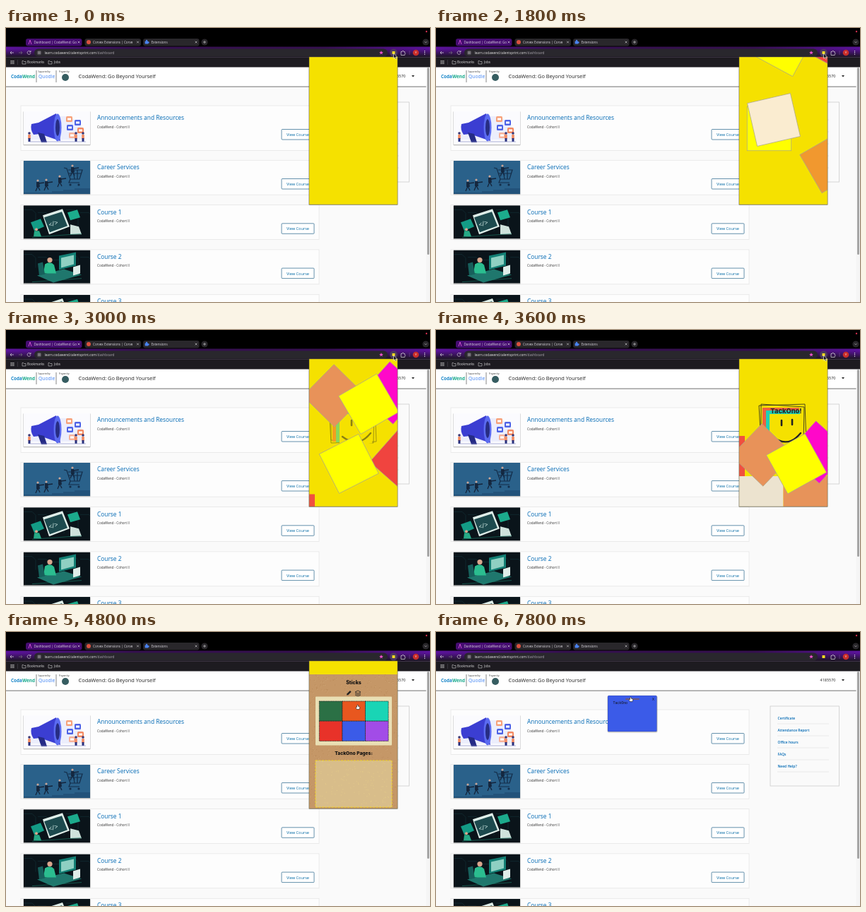
Write an HTML page that moves like this. It is 600 px wide and 388 px high and loops after 8 s.

```html
<!DOCTYPE html>
<html lang="en">
<head>
<meta charset="utf-8">
<title>Sticky notes</title>
<style>
html, body { margin: 0; width: 100%; height: 100%; overflow: hidden; background: #fafafa; }
svg { display: block; width: 600px; height: 388px; font-family: "Open Sans", sans-serif; }
.mono { font-family: "Liberation Mono", monospace; }
.bold { font-family: Inter, sans-serif; font-weight: 800; }
</style>
</head>
<body>
<svg id="stage" viewBox="0 0 600 388"></svg>
<script>
const LOOP = 8000, STEP = 200;
const stage = document.getElementById('stage');

const rect = (x, y, w, h, fill, more = '') =>
  `<rect x="${x}" y="${y}" width="${w}" height="${h}" fill="${fill}" ${more}/>`;
const dot = (x, y, r, fill, more = '') => `<circle cx="${x}" cy="${y}" r="${r}" fill="${fill}" ${more}/>`;
const path = (d, fill, more = '') => `<path d="${d}" fill="${fill}" ${more}/>`;
const line = (d, color, width = 0.7, more = '') =>
  path(d, 'none', `stroke="${color}" stroke-width="${width}" ${more}`);
// y is the middle of the line of text
const text = (x, y, size, fill, words, more = '') =>
  `<text x="${x}" y="${y + size * 0.35}" font-size="${size}" fill="${fill}" ${more}>${words}</text>`;
const group = (id, inner, more = '') => `<g id="${id}" ${more}>${inner}</g>`;
const middle = 'text-anchor="middle"';

function puzzle(x, y, color) {
  return rect(x - 2.4, y - 1.6, 4.6, 4.2, color, 'rx=".6"') + dot(x, y - 2, 1.2, color) + dot(x + 2.4, y + 0.5, 1.2, color);
}

function star(x, y, r, color) {
  const points = Array.from({ length: 10 }, (_, i) => {
    const a = i * Math.PI / 5 - Math.PI / 2, d = i % 2 ? r * 0.45 : r;
    return `${x + d * Math.cos(a)},${y + d * Math.sin(a)}`;
  });
  return `<polygon points="${points.join(' ')}" fill="${color}"/>`;
}

function tab(x, fill, icon, label) {
  return rect(x, 15, 79.5, 10.5, fill, 'rx="3"') + icon + text(x + 11.5, 20, 4.6, '#dcd9e0', label) +
    line(`M${x + 73.6} 18.600l2.800 2.800m0-2.800l-2.800 2.800`, '#ddd', 0.6);
}

function browser() {
  return rect(0, 0, 600, 29, '#000') +
    rect(0, 26.5, 600, 15, 'url(#theme)') + rect(0, 26.5, 600, 15, 'url(#shade)') +
    tab(28, '#450c70', line('M32 23l2-6 2 6', '#d955d9', 0.9), 'Dashboard | CodaWend: Go') +
    tab(111.5, '#29272b', dot(117, 20, 3, '#d9513f'), 'Corvex Extensions | Corve') +
    tab(194, '#29272b', puzzle(199, 20, '#4a83ee'), 'Extensions') +
    dot(281, 20, 4.6, '#29272b') + line('M279 20h4m-2-2v4', '#ddd', 0.6) +
    dot(594, 20, 4.6, '#29272b') + line('M592.500 19.300l1.500 1.500 1.500-1.500', '#ddd', 0.6) +
    dot(595, 5, 1.2, '#c92e4a') +
    rect(40, 29.5, 500, 11, '#29272d', 'rx="5.5"') +
    line('M11 35H6m2-2l-2 2 2 2', '#ddd') + line('M18 35h5m-2-2l2 2-2 2', '#777') +
    line('M34.500 33.500a2.400 2.400 0 1 0 .400 2M35 32v2h-2', '#ddd') +
    dot(47, 35, 3.5, '#444048') + line('M45 34h4M45 36h4', '#eee', 0.6) +
    text(54.5, 35, 4.75, '#e6e6e6', 'learn.codawend.talentsprint.com<tspan fill="#a6a3aa">/dashboard</tspan>') +
    star(531, 35, 3, '#f04fd0') +
    group('glow', dot(548.5, 35, 5.5, '#4c3a60')) + rect(546.5, 33, 4, 4, '#f5dc20') +
    line('M559 33.500h1.500a1.200 1.200 0 0 1 2.400 0h1.300v1.500a1.200 1.200 0 0 1 0 2.300v1.200h-5.200z', '#ddd') +
    line('M571 32v6', '#6d4590') +
    dot(580, 35, 4.3, '#c92e2a') + text(580, 35, 4, '#fff', 'V', middle) +
    [32.7, 35, 37.3].map(y => dot(592.5, y, 0.65, '#eee')).join('') +
    rect(0, 41.5, 600, 14, '#1d1b20') +
    [0, 1, 2].flatMap(i => [0, 1, 2].map(j => rect(6.5 + i * 1.9, 46 + j * 1.9, 1.2, 1.2, '#ccc'))).join('') +
    line('M16.500 45v7', '#55505c', 0.5) +
    [23, 60].map(x => line(`M${x} 46.500h1.500l1 1h2.500v3.500h-5z`, '#ccc', 0.6)).join('') +
    text(30, 48.5, 4.6, '#ddd', 'Bookmarks') + text(68, 48.5, 4.6, '#ddd', 'Jobs');
}

function header() {
  return rect(0, 55.5, 600, 27.5, '#fff') + rect(0, 82.5, 600, 1.2, '#888') +
    text(7, 69, 6.4, '#1685c8', 'Coda<tspan fill="#16a98b">Wend</tspan>', 'font-weight="700"') +
    line('M43 60v17M71 60v17', '#555', 0.7) +
    text(45.5, 62, 2.7, '#333', 'Supported by:') + text(46, 69, 6.8, '#4285f4', 'Quodle') +
    text(75, 62, 2.7, '#333', 'Program by:') + dot(84, 70, 5, '#365d61') +
    text(102.5, 68, 7.4, '#222', 'CodaWend: Go Beyond Yourself') +
    text(543.5, 68, 5.5, '#222', '4185570') + path('M574 67h4l-2 2.500z', '#222');
}

function megaphone() {
  return rect(0, 0, 94, 47, '#fbfbfe') +
    path('M8 40q0-14 12-16q4-16 22-14q20-8 32 4q14 8 10 26z', '#eceefc') +
    path('M11 18l10-2 25-13 6 39-29-10-9 1q-5-7-3-15z', '#3b3ed2') + path('M20 30l9 2 4 12h-8z', '#252b86') +
    `<ellipse cx="48" cy="23" rx="5.5" ry="19.500" fill="#5b6bf0"/><ellipse cx="48" cy="23" rx="3" ry="12" fill="#272d83"/>` +
    [[60, 7, '#f7a17a'], [72, 12, '#4d62e6'], [61, 19, '#4d62e6'], [76, 23, '#f38961'], [64, 30, '#f7b39a']]
      .map(([x, y, c]) => rect(x, y, 9, 8, c, 'rx="1.500"') + rect(x + 2, y + 2.5, 5, 3, '#fff')).join('') +
    [8, 74, 84].map(x => dot(x, 31, 1.8, '#39336e') + rect(x - 1.8, 33, 3.6, 6, '#f28b62') + rect(x - 1.5, 38, 3, 5, '#28307c')).join('') +
    line('M8 43H88', '#8a91c4', 0.7);
}

function climbers() {
  const person = (x, y) => dot(x, y, 1.6, '#c9a596') + path(`M${x - 2} ${y + 2}h4l1 7h-5z`, '#16283f') +
    line(`M${x} ${y + 8}l-3 7m3-7l3 6M${x + 1} ${y + 4}l8-1`, '#14243a', 1.3);
  return rect(0, 0, 94, 47, '#2a618a') + path('M0 47V45H40V43H56V41H72V39H94V47z', '#22527a') +
    person(20, 28) + person(32, 27) + person(51, 22) + person(69, 7) +
    line('M57 10l4 1 5 15h13l4-13H63M64 18h17M70 13l2 13M76 13v13', '#132c48', 1.2) +
    line('M66 26l-2 5h15', '#132c48', 1.2) + dot(66, 34, 1.6, '#132c48') + dot(78, 34, 1.6, '#132c48');
}

function coding(desk) {
  const circuits = [0, 1, 2, 3, 4].map(i => line(`M${i * 20} ${6 + i % 3 * 4}h12l5 5v${14 + i * 2}`, '#173a40', 0.5)).join('');
  const screen = desk
    ? path('M50 8l24-5v19l-24 6z', '#137f74') + path('M53 11l18-4v13l-18 5z', '#8fd0c2') +
      path('M19 36l38-9 25 8-40 11z', '#1f776d') + dot(37, 14, 3.6, '#d9a68d') +
      path('M30 20q8-5 13 1l3 12H28z', '#2bbd8f') + path('M20 19l7-2 3 17-8 2z', '#17605c') +
      path('M70 24l10-3v12l-10 3z', '#dfeee9')
    : path('M27 14l28-9 10 25-29 11z', '#dfeee9') + path('M29 17l25-8 8 20-25 9z', '#1d4a4e') +
      text(35, 25, 9, '#e9fff8', '&lt;/&gt;', 'transform="rotate(-18 44 25)"') +
      path('M10 24l14-5 5 11-14 6z', '#139b85') + path('M62 10l14-4 4 11-14 4z', '#1cab8c') +
      dot(18, 34, 2, '#d9a68d') + path('M15 36h7l3 8H14z', '#26a986') + path('M66 27l12 3 4 11H66z', '#cfe2dc');
  return rect(0, 0, 94, 47, '#0a141a') + circuits + screen + line('M12 45l70-5', '#1f826e', 0.6);
}

// top is the upper edge of the picture, pad the room the frame leaves around it
function card(top, pad, title, art) {
  return rect(21, top - pad, 422, 47.5 + pad * 2, '#fdfdfd', 'stroke="#e6e6e6" stroke-width=".8"') +
    rect(24.5, top, 95, 48.3, '#bbb', 'rx="1"') +
    `<svg x="25" y="${top}" width="94" height="47" viewBox="0 0 94 47">${art}</svg>` +
    text(129, top + 9.3, 8.35, '#0069b4', title) +
    text(129, top + 22, 4.6, '#333', 'CodaWend - Cohort II') +
    rect(390, top + 25.5, 46, 14.5, '#fff', 'rx="1" stroke="#3e7597" stroke-width=".8"') +
    text(413, top + 33, 5.6, '#0069a4', 'View Course', middle);
}

function sidebar() {
  const links = ['Certificate', 'Attendance Report', 'Office hours', 'FAQs', 'Need Help?'];
  return rect(473, 105, 97.5, 113, '#fafafa', 'stroke="#ccc" stroke-width=".8"') +
    links.map((label, i) => text(483.5, 122 + i * 17, 4.95, '#0069b4', label, 'font-weight="600"') +
      line(`M483 ${130 + i * 17}h73`, '#ddd', 0.6)).join('');
}

// ref time, x, y, angle, colour, then speeds per second: x, y, angle
const falling = [
  [1800, 557.5, 191, -30, '#f1982f', 0, 200, 0],
  [1800, 471.5, 142.5, 0, '#ffff00', 0, 200, 0],
  [1800, 478, 130, -13, '#faecd0', 0, 200, -10],
  [2600, 558, 128, -23, '#f0443f', 2, 140, -64],
  [2600, 487.5, 135, -8.5, '#ffff00', -5.6, 136, -46],
  [2600, 466, 37, 45, '#e89259', -4, 140, -1],
  [2600, 549, 33, 42, '#ff08c9', -9, 140, 0],
  [2600, 515.6, 48.4, -31, '#ffff00', -5.6, 141, 2]
];
const BEHIND_PILE = 5;

function logo() {
  return line('M457 107l65-2 2 53-64 2zM460 105l61 4-1 51-60-4z', '#222', 0.8) +
    rect(462, 110, 52, 48, '#f0603f') + rect(467, 114, 48, 45, '#1fd1b6') + rect(472, 119, 46, 41, '#f5e100') +
    line('M489 128v7M504 127v7', '#222', 2.6, 'stroke-linecap="round"') +
    line('M476 151q22 17 40-5', '#222', 2.3, 'stroke-linecap="round"') +
    text(495.5, 115, 9.3, '#292929', 'TackOno!', middle + ' class="bold"');
}

function splash() {
  const slips = falling.map(n =>
    rect(-31.25, -31.25, 62.5, 62.5, n[4], 'class="slip" stroke="#aaa58a" stroke-width=".7"'));
  const pile = rect(374.5, 150, 62.5, 62.5, '#f0503f') + rect(429, 207, 62.5, 62.5, '#ece3cf') +
    rect(491.5, 207, 62.5, 62.5, '#e7935a');
  return rect(429, 41, 125, 209, '#f5e100') + group('logo', logo()) +
    slips.slice(0, BEHIND_PILE).join('') + group('pile', pile) + slips.slice(BEHIND_PILE).join('');
}

function specks(count, x, y, w, h) {
  let seed = 7, d = '';
  const random = () => (seed = seed * 16807 % 2147483647) / 2147483647;
  for (let i = 0; i < count; i++) d += `M${(x + random() * w).toFixed(1)} ${(y + random() * h).toFixed(1)}h.9`;
  return d;
}

function board() {
  const swatches = ['#2b7045', '#e8571f', '#19d5b5', '#e83229', '#3b5be8', '#a24ce7'];
  return rect(429, 41, 125, 209, '#c59767') +
    line(specks(850, 429, 60, 124, 189), '#a97948', 0.8, 'opacity=".6"') +
    line(specks(420, 430, 61, 123, 188), '#debb8b', 0.8, 'opacity=".6"') +
    rect(429, 41, 125, 19, '#f5e100') +
    text(492, 71.5, 7, '#111', 'Sticks', middle + ' class="bold"') +
    path('M482 89.500l.6-2.200 4.300-4.300 1.700 1.700-4.300 4.300z', '#222') +
    line('M494 85l4-2 4 2-4 2zM494 87l4 2 4-2M494 89l4 2 4-2', '#222', 0.8) +
    rect(438, 91.5, 108, 69, '#e9dfb4', 'rx="1"') +
    swatches.map((c, i) => rect(443.3 + i % 3 * 32.6, 98 + (i > 2 ? 28.2 : 0), 32.6, 28.2, c,
      'stroke="#222" stroke-width=".8" stroke-dasharray="1.600 .8"')).join('') +
    text(492, 171.5, 6.7, '#111', 'TackOno Pages:', middle + ' class="bold"') +
    rect(438, 182, 108, 66, '#d8bd8a', 'stroke="#f2d628" stroke-width="1" stroke-dasharray="3 1.500"') +
    line(specks(160, 439, 183, 106, 64), '#e6cf8a', 0.8);
}

stage.innerHTML = `<defs>
  <linearGradient id="theme"><stop offset="0" stop-color="#5a129a"/><stop offset=".3" stop-color="#35104f"/>
    <stop offset=".75" stop-color="#35104f"/><stop offset="1" stop-color="#5a129a"/></linearGradient>
  <linearGradient id="shade" x2="0" y2="1"><stop offset=".2" stop-color="#1a161e" stop-opacity="0"/>
    <stop offset="1" stop-color="#1a161e"/></linearGradient>
  <clipPath id="window"><rect x="429" y="41" width="125" height="209"/></clipPath></defs>` +
  rect(0, 55, 600, 333, '#fafafa') + header() +
  card(118, 8, 'Announcements and Resources', megaphone()) +
  card(188, 0.7, 'Career Services', climbers()) +
  card(251.3, 0.7, 'Course 1', coding(false)) +
  card(314.6, 0.7, 'Course 2', coding(true)) +
  card(378, 0.7, 'Course 3', coding(false)) + sidebar() +
  rect(594.5, 55.5, 5.5, 333, '#f5f5f5') + rect(596, 56, 3, 265, '#a5a5a5', 'rx="1.500"') + browser() +
  group('memo', rect(242.5, 90.5, 71, 52, '#000', 'rx="2" opacity=".2"') +
    rect(243, 90, 69.5, 51, '#a24ce7', 'id="paper" rx="1.500" stroke="#0003" stroke-width=".6"') +
    rect(268, 94, 20, 2, '#6e5a78', 'rx="1"') + text(307.5, 95.5, 5, '#111', 'X', middle) +
    text(250.5, 100.5, 4.9, '#111', 'TackOno', 'class="mono"')) +
  group('popup', rect(428.5, 41, 126, 210, '#000', 'rx="1" opacity=".3"') +
    `<g clip-path="url(#window)">${group('splash', splash())}${group('board', board())}</g>` +
    rect(429, 41, 125, 209, 'none', 'stroke="#77724a" stroke-width=".5"')) +
  group('arrow', path('M0 0v7l1.700-1.500 1.200 2.600 1.200-.6-1.200-2.400h2.300z', '#111', 'stroke="#fff" stroke-width=".6"')) +
  group('hand', path('M-1 -2.500q.8-1 1.400 0v1.800q2 0 2.200 1v1.800l-.8 1.500h-3.200l-1.800-2.400q0-1 1.400-.3z', '#fff', 'stroke="#111" stroke-width=".6"'));

const $ = id => document.getElementById(id);
const slips = [...document.querySelectorAll('.slip')];
const show = (id, on) => $(id).style.display = on ? '' : 'none';
const move = (el, x, y, angle = 0) => el.setAttribute('transform', `translate(${x} ${y}) rotate(${angle})`);
const clamp = v => Math.max(0, Math.min(1, v));

// time, x, y
const pointer = [
  [0, 548.5, 36], [4000, 548.5, 36], [4600, 498, 106], [4800, 498, 106], [5200, 525, 140],
  [5600, 525, 140], [6000, 481, 146], [6400, 481, 146], [7000, 345, 125], [7400, 276, 95], [8000, 276, 95]
];

function pointerAt(t) {
  const i = pointer.findIndex(p => p[0] > t);
  const [a, b] = [pointer[i - 1], pointer[i]];
  const k = (t - a[0]) / (b[0] - a[0]), e = k * k * (3 - 2 * k);
  return [a[1] + (b[1] - a[1]) * e, a[2] + (b[2] - a[2]) * e];
}

function draw(t) {
  const open = t < 7000, intro = t < 4000;
  show('popup', open);
  show('glow', open);
  show('splash', intro);
  show('board', !intro);
  $('logo').setAttribute('opacity', clamp((t - 2800) / 400));
  move($('pile'), 0, 110 * (1 - clamp((t - 2800) / 800)));
  falling.forEach(([t0, x, y, angle, , vx, vy, spin], i) => {
    const s = (t - t0) / 1000;
    move(slips[i], x + vx * s, y + vy * s, angle + spin * s);
  });
  show('memo', t >= 5400);
  $('paper').setAttribute('fill', t >= 6400 ? '#3b5be8' : '#a24ce7');
  const [x, y] = pointerAt(t);
  const hand = (t >= 4600 && t < 6600) || t >= 7400;
  show('hand', hand);
  show('arrow', !hand);
  move($('hand'), x, y);
  move($('arrow'), x, y);
}

const start = performance.now();
function tick() {
  const t = (performance.now() - start) % LOOP;
  draw(Math.floor(t / STEP) * STEP);
  requestAnimationFrame(tick);
}
tick();
</script>
</body>
</html>
```
